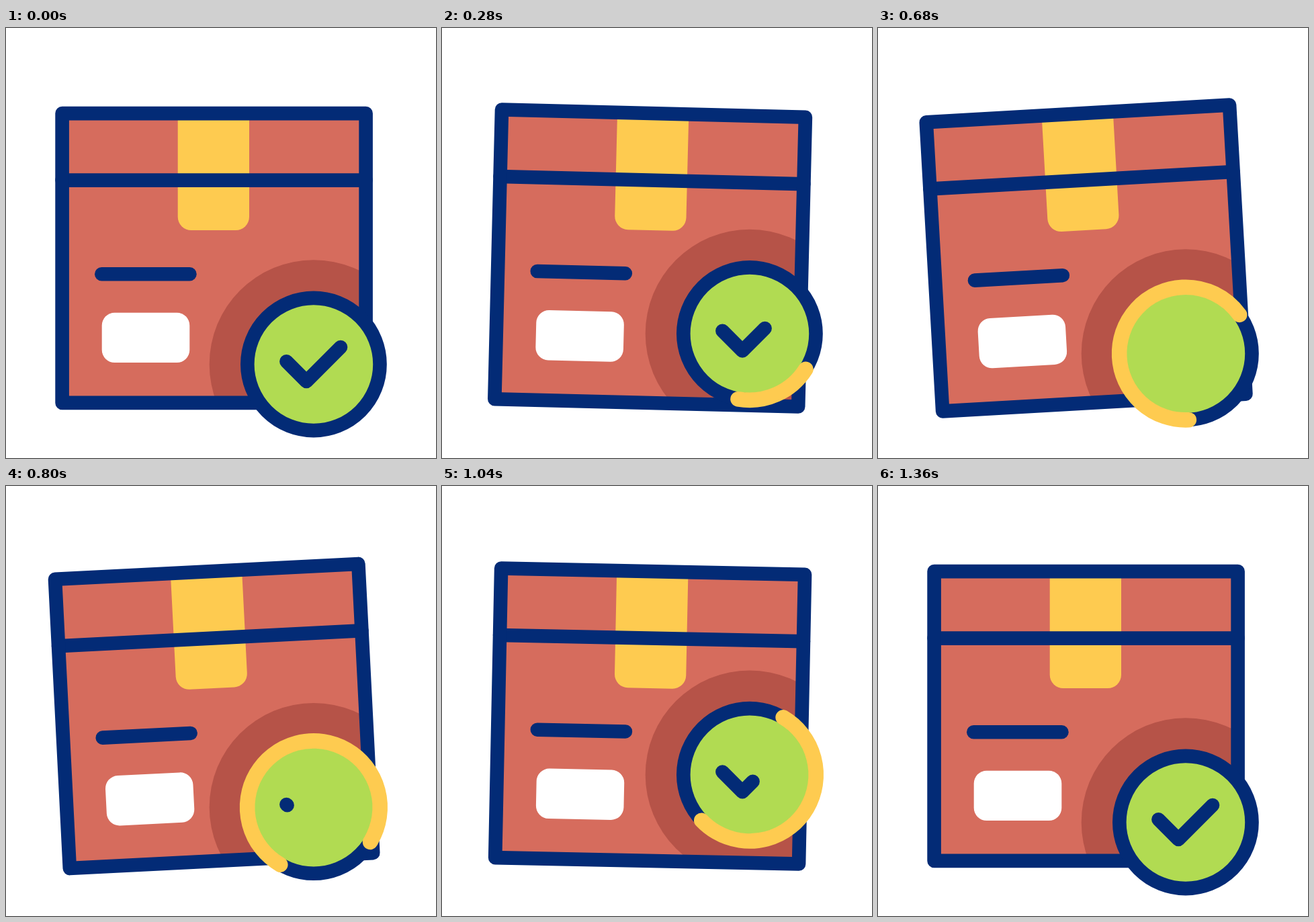
Recreate the animation shown at these times as an HTML page with a canvas. Size 640 by 640 pixels, loop 2000 ms.

```html
<!DOCTYPE html>
<html lang="en">
<head>
<meta charset="utf-8">
<title>Parcel confirmed</title>
<style>
  html, body { margin: 0; height: 100%; overflow: hidden; background: #fff; }
  canvas { display: block; width: 100vw; height: 100vh; }
</style>
</head>
<body>
<canvas id="stage" width="640" height="640"></canvas>
<script>
const ctx = document.getElementById('stage').getContext('2d');
const NAVY = '#032b76', RED = '#d66c5d', SHADE = '#b65348', YELLOW = '#fecb50', GREEN = '#b1db52';
const LOOP = 2000, STEP = 40;
const CENTER = { x: 309.6, y: 342.4 };
const BADGE = { x: 457.9, y: 500.5 };

// [time in ms, value], eased between neighbours
const TILT = [[175, 0], [470, 5.05], [730, -4.05], [960, 1.35], [1320, 0]];
const LIFT = [[80, 0], [400, -65.8], [720, -14], [1040, -70.8], [1360, 0]];
const TICK = [[120, 1], [640, 0], [760, 0], [1280, 1]];

const rad = deg => deg * Math.PI / 180;
const progress = (t, from, to) => Math.min(1, Math.max(0, (t - from) / (to - from)));

function track(keys, t) {
  let value = keys[0][1];
  for (let i = 1; i < keys.length; i++) {
    const u = progress(t, keys[i - 1][0], keys[i][0]);
    value += (keys[i][1] - keys[i - 1][1]) * (1 - Math.cos(Math.PI * u)) / 2;
  }
  return value;
}

function fill(color, build) {
  ctx.beginPath();
  build();
  ctx.fillStyle = color;
  ctx.fill();
}

function stroke(color, width, build) {
  ctx.beginPath();
  build();
  ctx.strokeStyle = color;
  ctx.lineWidth = width;
  ctx.stroke();
}

function polyline(...points) {
  points.forEach(([x, y]) => ctx.lineTo(x, y));
}

const disc = (y, r) => ctx.arc(BADGE.x, y, r, 0, 2 * Math.PI);
const boxRect = () => ctx.rect(83.6, 127.1, 452, 430.8);

function rotateBox(deg) {
  ctx.translate(CENTER.x, CENTER.y);
  ctx.rotate(rad(deg));
  ctx.translate(-CENTER.x, -CENTER.y);
}

function drawBox(tilt, badgeY) {
  ctx.save();
  rotateBox(tilt);
  fill(RED, boxRect);
  fill(YELLOW, () => ctx.roundRect(255.7, 128, 106.3, 173, [0, 0, 20, 20]));
  fill('#fff', () => ctx.roundRect(142.7, 423.7, 130.6, 74.4, 19));
  stroke(NAVY, 20.6, () => polyline([142.3, 366.2], [273.4, 366.2]));

  // the badge's shade stays upright but only falls on the box
  ctx.save();
  ctx.beginPath();
  boxRect();
  ctx.clip();
  rotateBox(-tilt);
  fill(SHADE, () => disc(badgeY, 155.2));
  ctx.restore();

  stroke(NAVY, 20.6, () => polyline([83.6, 226.6], [535.6, 226.6]));
  stroke(NAVY, 20.6, boxRect);
  ctx.restore();
}

function drawTick(amount, y) {
  if (amount <= 0.001) return;
  const short = 42, long = 72, k = Math.SQRT1_2;
  const length = amount * (short + long);
  const a = Math.min(length, short) * k, b = Math.max(0, length - short) * k;
  const x0 = 417.4, y0 = y - 4.2;
  stroke(NAVY, 20.6, () => polyline([x0, y0], [x0 + a, y0 + a], [x0 + a + b, y0 + a - b]));
}

function drawSweep(t, y) {
  const head = 360 * progress(t, 120, 970);
  const tail = 360 * progress(t, 773, 1360);
  if (head - tail < 0.01) return;
  const turn = 0.137 * t - 6;
  stroke(YELLOW, 22.6, () => ctx.arc(BADGE.x, y, 98.8, rad(turn + tail), rad(turn + head)));
}

function draw(t) {
  const y = BADGE.y + track(LIFT, t);
  ctx.fillStyle = '#fff';
  ctx.fillRect(0, 0, 640, 640);
  ctx.lineCap = ctx.lineJoin = 'round';
  drawBox(track(TILT, t), y);
  fill(GREEN, () => disc(y, 98));
  stroke(NAVY, 20.6, () => disc(y, 98.6));
  drawTick(track(TICK, t), y);
  drawSweep(t, y);
}

const start = performance.now();
function tick() {
  const t = (performance.now() - start) % LOOP;
  draw(Math.floor(t / STEP) * STEP);
  requestAnimationFrame(tick);
}
tick();
</script>
</body>
</html>
```
